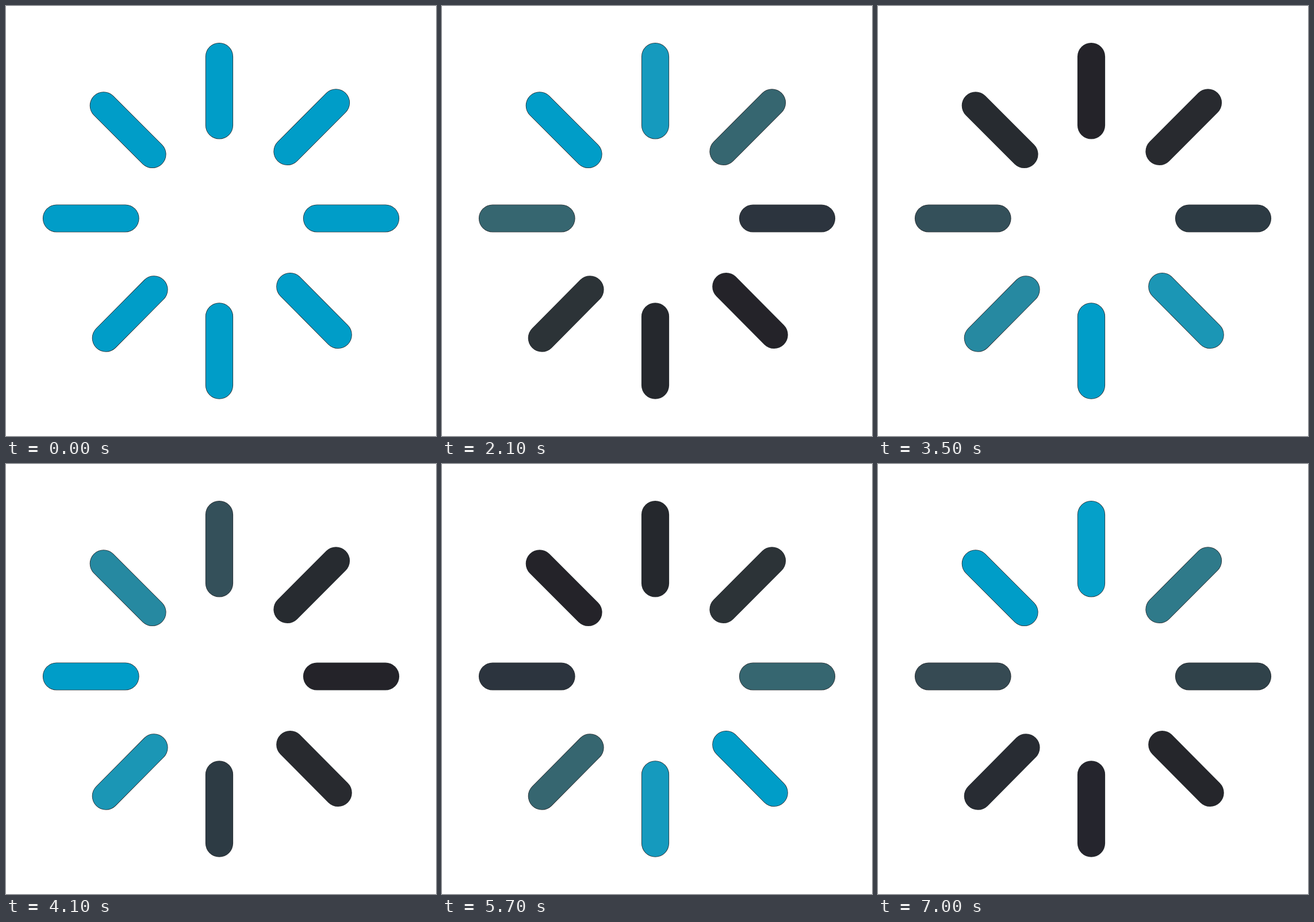
Recreate the animation shown at these times as an HTML page. Size 748x748 px, loop 7100 ms.

```html
<!DOCTYPE html>
<html lang="en">
<head>
<meta charset="utf-8">
<title>Spinner</title>
<style>
  html, body { margin: 0; width: 100%; height: 100%; overflow: hidden; background: #fff; }
  svg { display: block; width: 100%; height: 100%; }
  path { fill: none; stroke-linecap: round; }
  .edge { stroke: #262a2e; stroke-width: 48.2; }
  .bar { stroke: #009dc8; stroke-width: 46.6; }
</style>
</head>
<body>
<svg viewBox="0 0 748 748"></svg>
<script>
const LOOP = 7100, STEP = 100, LAG = 3;

// Clockwise from the top
const shapes = [
  'M371 88V207.5', 'M574 168.3L489.5 253',
  'M541 369.5H660', 'M494.3 488L577.7 572',
  'M371 540.3V659.7', 'M257.5 493.3L173.8 577.7',
  'M88 369.5H207.5', 'M169.8 173.3L254.5 258'
];

// One colour per step of a bar's cycle: hold, quick fall, slow rise
const cycle = (
  '009dc8 009dc8 009dc8 1b96b5 366670 364a53 2d3b44 2c3337 ' +
  '282c33 282a2f 25282d 25252d 242329 242329 25262b 272b30 ' +
  '2c343e 30424a 34505a 366670 2f7a8a 2689a1 159abe 05a0c9'
).split(' ').map(hex => '#' + hex);

const svg = document.querySelector('svg');

function addPath(d, name) {
  const path = document.createElementNS(svg.namespaceURI, 'path');
  path.setAttribute('d', d);
  path.setAttribute('class', name);
  svg.append(path);
  return path;
}

const bars = shapes.map(d => {
  addPath(d, 'edge');
  return addPath(d, 'bar');
});

function draw(now) {
  const tick = Math.floor((now % LOOP) / STEP);
  bars.forEach((bar, i) => {
    // Each bar stays blue until its first turn
    const phase = Math.max(0, tick + 1 - i * LAG);
    bar.style.stroke = cycle[phase % cycle.length];
  });
}

function frame(now) {
  draw(now);
  requestAnimationFrame(frame);
}

draw(0);
requestAnimationFrame(frame);
</script>
</body>
</html>
```
